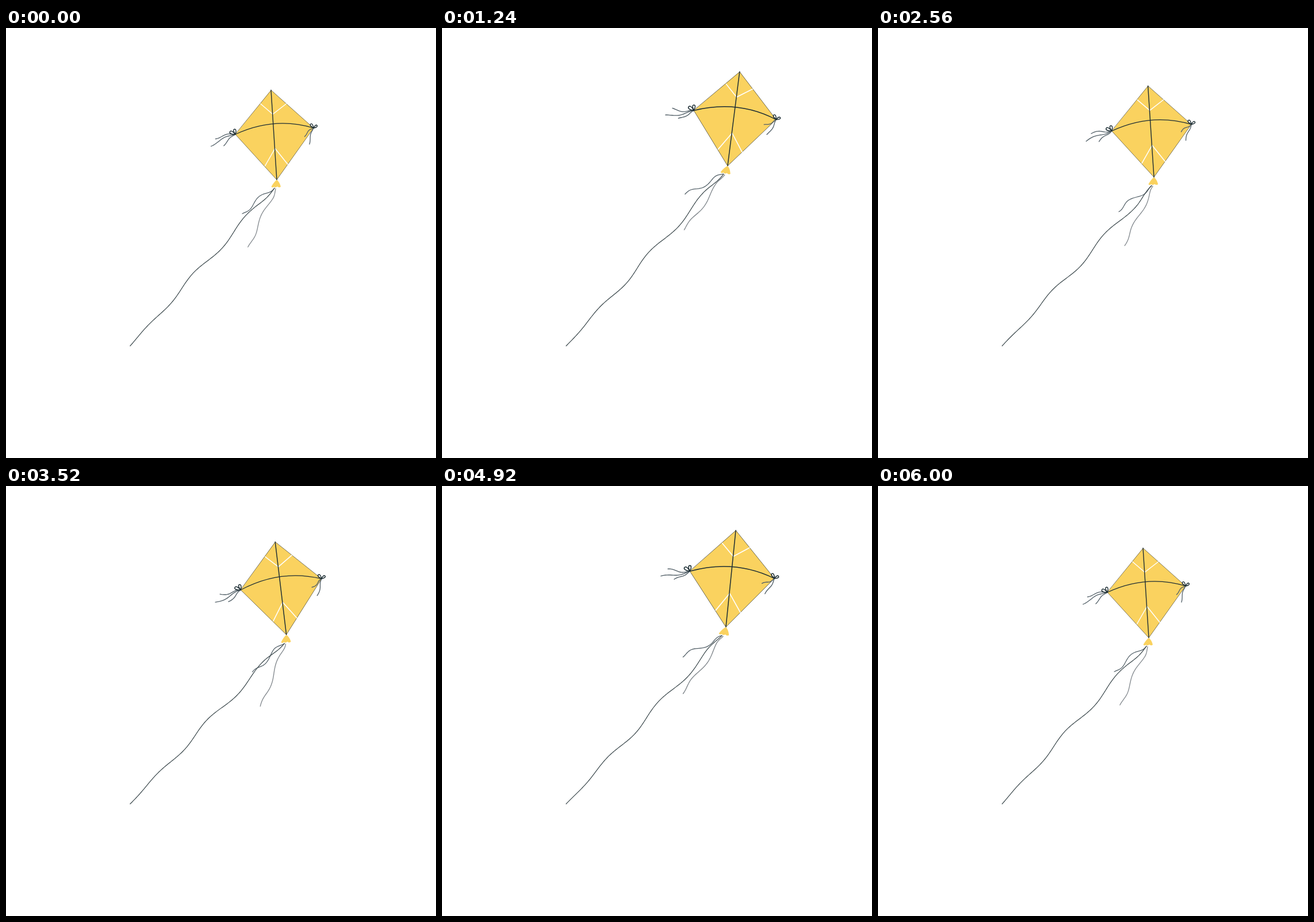
Write an HTML page with a canvas that moves like this. It is 748 by 748 pixels and loops after 6040 ms.

```html
<!DOCTYPE html>
<html lang="en">
<head>
<meta charset="utf-8">
<title>Kite</title>
<style>
  html, body { margin: 0; width: 100%; height: 100%; overflow: hidden; background: #fff; }
  canvas { display: block; width: 748px; height: 748px; }
</style>
</head>
<body>
<canvas id="stage" width="748" height="748"></canvas>
<script>
const ctx = document.getElementById('stage').getContext('2d');
const TAU = Math.PI * 2;
const LOOP = 6040, STEP = 40, CYCLE = 6000, WAVE = 2000;

const YELLOW = '#fad25f', INK = '#1c2d33', STRING = '#3a474b', TAIL = '#536068', PALE = '#83898e';

// Kite corners, relative to its centre
const TOP = [-5, -78], LEFT = [-67, -1], RIGHT = [69, -12], BOTTOM = [5, 78];
const KNOT = [1, 92.5];
const ANCHOR = [216, 553];

// Tilt in degrees over one cycle: [ms, degrees]
const TILT = [
  [0, 0], [640, 6.5], [1280, 11], [1920, 7.9], [2560, -0.1], [3100, -4.8],
  [3520, -3.2], [4200, 5.5], [4750, 9.8], [4920, 9.5], [5500, 2.8]
];

// Smooth periodic curve through the keys
function spline(keys, t) {
  const n = keys.length;
  const at = i => {
    const turn = Math.floor(i / n), k = keys[i - turn * n];
    return [k[0] + turn * CYCLE, k[1]];
  };
  let i = n - 1;
  while (keys[i][0] > t) i--;
  const [a, b, c, d] = [at(i - 1), at(i), at(i + 1), at(i + 2)];
  const h = c[0] - b[0], u = (t - b[0]) / h;
  const m0 = (c[1] - a[1]) / (c[0] - a[0]) * h;
  const m1 = (d[1] - b[1]) / (d[0] - b[0]) * h;
  const u2 = u * u, u3 = u2 * u;
  return (2 * u3 - 3 * u2 + 1) * b[1] + (u3 - 2 * u2 + u) * m0
       + (3 * u2 - 2 * u3) * c[1] + (u3 - u2) * m1;
}

function pose(t) {
  const a = TAU * t / CYCLE;
  const lift = (1 - Math.cos(2 * a)) / 2;
  return {
    x: 466 + 44.5 * lift,
    y: 186 - 30.2 * lift,
    turn: spline(TILT, t) * Math.PI / 180,
    scale: 1 + 0.075 * lift - 0.0185 * Math.sin(a) + 0.006 * (1 - Math.cos(a))
  };
}

function toStage(p, [x, y]) {
  const c = Math.cos(p.turn) * p.scale, s = Math.sin(p.turn) * p.scale;
  return [p.x + x * c - y * s, p.y + x * s + y * c];
}

function stroke(color, width) {
  ctx.strokeStyle = color;
  ctx.lineWidth = width;
  ctx.stroke();
}

function line(points, color, width) {
  ctx.beginPath();
  points.forEach(q => ctx.lineTo(...q));
  stroke(color, width);
}

// A thread between two points with a wave running along it.
// side: 1 or -1 picks the positive side; start/end: taper lengths
function thread(from, to, o) {
  const dx = to[0] - from[0], dy = to[1] - from[1];
  const len = Math.hypot(dx, dy), points = [];
  const nx = dy / len * o.side, ny = -dx / len * o.side;
  const n = Math.ceil(len / 2.5);
  const ease = u => u < 1 ? Math.sin(u * TAU / 4) : 1;
  for (let i = 0; i <= n; i++) {
    const s = len * i / n;
    const taper = ease(s / o.start) * (o.end ? ease((len - s) / o.end) : 1);
    const w = taper * ((o.bias || 0) + o.amp * Math.cos(TAU * (s - o.crest) / o.length));
    points.push([from[0] + dx * i / n + nx * w, from[1] + dy * i / n + ny * w]);
  }
  line(points, o.color, o.width);
}

function ribbon([x, y], [dx, dy], phase, amp) {
  const len = Math.hypot(dx, dy);
  thread([x, y], [x + dx, y + dy], {
    side: -1, start: len * 0.6, amp, length: len * 1.4,
    crest: len * (0.3 + 1.4 * phase), color: TAIL, width: 1.3
  });
}

function bowLoop([x, y], [dx, dy], fat) {
  const nx = -dy * fat, ny = dx * fat;
  ctx.beginPath();
  ctx.moveTo(x, y);
  ctx.bezierCurveTo(x + dx * 0.6 + nx, y + dy * 0.6 + ny, x + dx + nx, y + dy + ny, x + dx, y + dy);
  ctx.bezierCurveTo(x + dx - nx, y + dy - ny, x + dx * 0.6 - nx, y + dy * 0.6 - ny, x, y);
  stroke(INK, 1.4);
}

function sail() {
  ctx.beginPath();
  [TOP, RIGHT, BOTTOM, LEFT].forEach(q => ctx.lineTo(...q));
  ctx.closePath();
  ctx.fillStyle = YELLOW;
  ctx.fill();
  stroke('#4a4a3c', 0.7);
  line([[-23, -54], [-2, -36], [21.3, -54]], '#fff', 1.5);
  line([[-15.5, 54], [2, 23.5], [24, 51]], '#fff', 1.5);
  line([TOP, BOTTOM], INK, 1.4);
  ctx.beginPath();
  ctx.moveTo(...LEFT);
  ctx.quadraticCurveTo(1, -32.5, ...RIGHT);
  stroke(INK, 1.3);
}

function tassel() {
  ctx.save();
  ctx.translate(...BOTTOM);
  ctx.beginPath();
  ctx.moveTo(0, 0);
  ctx.quadraticCurveTo(-5, 4, -9.5, 12);
  ctx.quadraticCurveTo(-7.5, 14.5, -4.5, 12.2);
  ctx.quadraticCurveTo(-2, 14.5, 1, 11.8);
  ctx.quadraticCurveTo(4, 14.5, 7, 12);
  ctx.quadraticCurveTo(5, 4, 0, 0);
  ctx.fillStyle = YELLOW;
  ctx.fill();
  ctx.restore();
}

function draw(t) {
  const p = pose(t), phase = t / WAVE;
  ctx.clearRect(0, 0, 748, 748);
  ctx.lineCap = ctx.lineJoin = 'round';

  ctx.save();
  ctx.translate(p.x, p.y);
  ctx.rotate(p.turn);
  ctx.scale(p.scale, p.scale);
  sail();
  tassel();

  const [kx, ky] = KNOT;
  thread([kx + 2, ky + 1], [kx - 46.2, ky + 102.5], {
    side: -1, start: 18, end: 32, bias: -0.3, amp: 3.2, length: 83,
    crest: 52 + 83 * phase, color: PALE, width: 1.3
  });
  thread(KNOT, [kx - 56, ky + 44.5], {
    side: -1, start: 22, end: 24, bias: 0.6, amp: 4.6, length: 66,
    crest: 30 + 66 * phase, color: TAIL, width: 1.2
  });

  ribbon(LEFT, [-35, 5], phase, 3);
  ribbon(LEFT, [-43.5, 18], phase, 3);
  ribbon(LEFT, [-21.5, 18.4], phase, 2);
  bowLoop(LEFT, [-9.5, -4.5], 0.3);
  bowLoop(LEFT, [-1.5, -9], 0.3);

  ribbon(RIGHT, [-17, 13], phase, 2.3);
  ribbon(RIGHT, [-9, 27.5], phase, 2);
  bowLoop(RIGHT, [-5, -7], 0.3);
  bowLoop(RIGHT, [6, -4.5], 0.3);
  ctx.restore();

  // The wave runs from the kite down to the hand, and the whole string sways
  thread(ANCHOR, toStage(p, KNOT), {
    side: 1, start: 190, end: 45, amp: 4, length: 137,
    bias: 1.2 * Math.cos(TAU * (phase - 0.85)),
    crest: 165 - 137 * phase, color: STRING, width: 1.2
  });
}

function tick() {
  const t = Math.floor(performance.now() % LOOP / STEP) * STEP;
  draw(t % CYCLE);
  requestAnimationFrame(tick);
}
tick();
</script>
</body>
</html>
```
